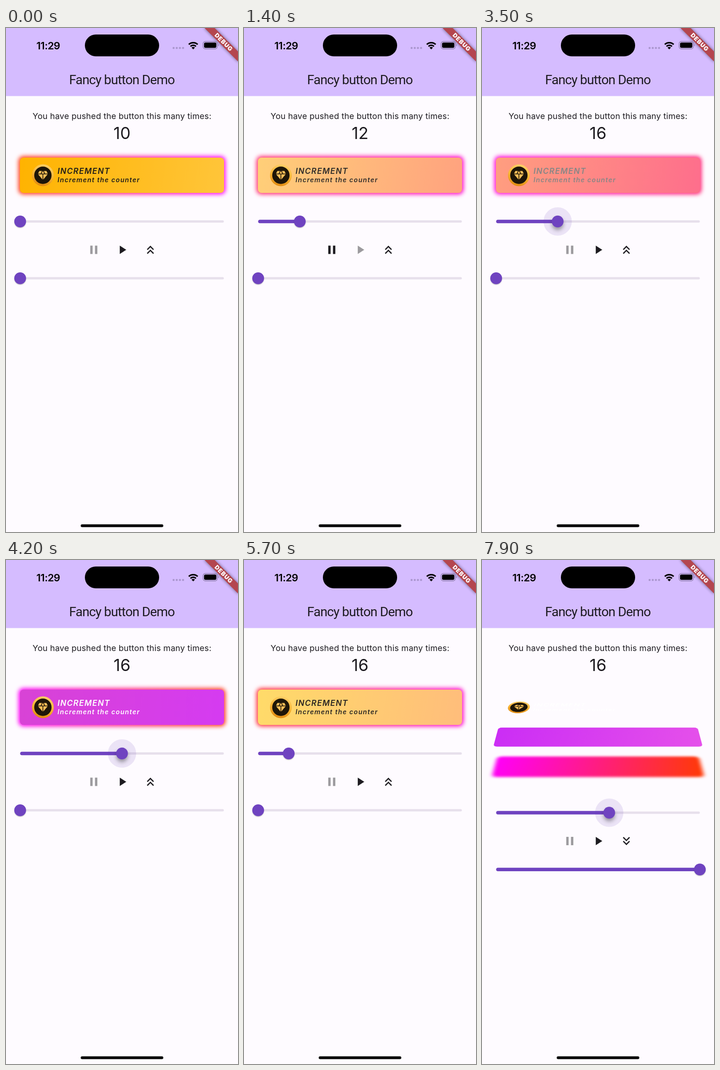
Write an HTML page that moves like this. It is 500 px wide and 1085 px high and loops after 8000 ms.

```html
<!DOCTYPE html>
<html lang="en">
<head>
<meta charset="utf-8">
<title>Fancy button Demo</title>
<style>
  html, body { margin: 0; width: 100%; height: 100%; overflow: hidden; background: #fefbff; }
  #stage { position: relative; width: 500px; height: 1085px; overflow: hidden; background: #fefbff; }
  svg { position: absolute; left: 0; top: 0; font-family: Inter, "Open Sans", sans-serif; }
  .layer { position: absolute; left: 30px; top: 279px; width: 440px; height: 76px; }
  #plate { border-radius: 8px; }
  #glow { margin: -3px; padding: 3px; border-radius: 10px; filter: blur(5px); }
  #label svg { overflow: visible; }
  #label text { font-weight: 600; font-style: italic; letter-spacing: 1.3px; }
</style>
</head>
<body>
<div id="stage">
  <svg width="500" height="1085" viewBox="0 0 500 1085">
    <defs>
      <filter id="soft" x="-50%" y="-200%" width="200%" height="500%"><feGaussianBlur stdDeviation="3.5"/></filter>
    </defs>
    <rect width="500" height="146.5" fill="#d5bcff"/>
    <text x="91" y="45.5" font-size="22" font-weight="600" letter-spacing="-.5" text-anchor="middle">11:29</text>
    <rect x="170" y="14" width="160" height="47" rx="23.5"/>
    <g fill="#ab97cf">
      <circle cx="361.2" cy="43" r="2.3"/><circle cx="368" cy="43" r="2.3"/>
      <circle cx="374.8" cy="43" r="2.3"/><circle cx="381.6" cy="43" r="2.3"/>
    </g>
    <g fill="none" stroke="#000" stroke-width="3.2">
      <path d="M393.9 35.4a13.9 13.9 0 0 1 19.2 0"/>
      <path d="M397.6 39.6a8.5 8.5 0 0 1 11.8 0"/>
    </g>
    <path d="M403.5 46l-3.6-3.7a5.2 5.2 0 0 1 7.2 0z"/>
    <rect x="424.6" y="29" width="31" height="16" rx="5" fill="none" stroke="#8f7eac" stroke-width="1.3"/>
    <rect x="426.8" y="31.2" width="26.6" height="11.6" rx="3.2"/>
    <path d="M457.2 34.5q2.4 2.5 0 5z" fill="#8f7eac"/>
    <g transform="translate(469.4 30.6) rotate(45)">
      <rect x="-51" y="-7.6" width="102" height="15.3" opacity=".5" filter="url(#soft)"/>
      <rect x="-51" y="-7.6" width="102" height="15.3" fill="#b4464f"/>
      <text y="4.6" font-size="12.8" font-weight="900" letter-spacing="1" fill="#fff" text-anchor="middle">DEBUG</text>
    </g>
    <g fill="#1d1b20" text-anchor="middle">
      <text x="249.6" y="121" font-size="28" letter-spacing="-.85" style="font-family:Roboto,sans-serif">Fancy button Demo</text>
      <text x="250" y="196" font-size="17.8" letter-spacing=".2">You have pushed the button this many times:</text>
      <text id="count" x="250" y="238.5" font-size="35.6">10</text>
    </g>
    <rect x="161" y="1068.5" width="178" height="6" rx="3"/>
  </svg>

  <div id="glow" class="layer"></div>
  <div id="plate" class="layer"></div>
  <div id="label" class="layer">
    <svg width="440" height="76" viewBox="30 279 440 76">
      <defs>
        <linearGradient id="gold" x1=".65" y1="0" x2=".4" y2="1">
          <stop offset="0" stop-color="#ffd06a"/><stop offset=".5" stop-color="#f9b535"/><stop offset="1" stop-color="#df890f"/>
        </linearGradient>
      </defs>
      <circle cx="79.5" cy="317" r="23.5" fill="url(#gold)"/>
      <circle cx="79.5" cy="317" r="18.7" fill="#1e1608"/>
      <path transform="translate(79.5 317) scale(1.09) translate(-12 -11.55)" fill="#f6bd58"
        d="M12.16 3h-.32L9.21 8.25h5.58zM16.46 8.25h5.16L19 3h-5.16zM21.38 9.75h-8.63V20.1zM11.25 20.1V9.75H2.62zM7.54 8.25L10.16 3H5L2.38 8.25z"/>
      <text x="111" y="314" font-size="17">INCREMENT</text>
      <text x="111" y="332.3" font-size="14.1">Increment the counter</text>
    </svg>
  </div>

  <svg id="controls" width="500" height="1085" viewBox="0 0 500 1085"></svg>
</div>

<script>
const LOOP = 8000, STEP = 100, LEFT = 30.5, WIDTH = 439, DROP = 127.5;
const INK = '#1d1b20', OFF = '#9c9a9e';
const $ = id => document.getElementById(id);

// Both sliders over time: [ms, value]
const progress = [[0, 0], [378, 0], [2600, .4444], [3300, .4444], [3500, .302], [3800, .1],
  [4550, .85], [4900, .696], [5450, .15], [7440, .15], [7900, .555]];
const spread = [[0, 0], [6383, 0], [6883, 1]];
const halo = [[0, 0], [3250, 0], [3400, 1], [5450, 1], [5600, 0], [7400, 0], [7550, 1]];
const clicks = [1000, 1300, 1500, 1700, 1900, 2100];

// Colours over slider value
const plateColor = [[0, '#ffb300'], [.09, '#ffc53a'], [.15, '#ffdb69'], [.204, '#ffcf78'],
  [.28, '#ffa97e'], [.364, '#ff7e82'], [.39, '#ff6f8b'], [.46, '#e253bd'], [.555, '#cb2df5'],
  [.645, '#e550ea'], [.696, '#f764e2'], [.786, '#fc8fbd'], [1, '#ffb300']];
const glowLeft = [[0, '#ff3d10'], [.15, '#ff2d30'], [.204, '#ff2a6a'], [.302, '#ff00d8'],
  [.364, '#ff00ff'], [.555, '#ff00fa'], [.696, '#ff2a50'], [1, '#ff3d10']];
const glowRight = [[0, '#ff00ff'], [.15, '#ff00cc'], [.204, '#ff00cc'], [.302, '#ff1f70'],
  [.364, '#ff4030'], [.555, '#ff3a05'], [.696, '#ff3040'], [1, '#ff00ff']];
const textColor = [[0, '#231f1a'], [.2, '#2c2926'], [.302, '#888686'], [.364, '#d2cacc'],
  [.45, '#ffffff'], [.6, '#ffffff'], [.696, '#c6bec2'], [.9, '#231f1a']];

function sample(table, x, mix) {
  const i = table.findIndex(p => p[0] > x);
  if (i < 0) return table[table.length - 1][1];
  if (!i) return table[0][1];
  const [x0, a] = table[i - 1], [x1, b] = table[i];
  return mix(a, b, (x - x0) / (x1 - x0));
}
const lerp = (a, b, k) => a + (b - a) * k;
const channels = hex => [1, 3, 5].map(i => parseInt(hex.slice(i, i + 2), 16));
function blend(a, b, k) {
  const end = channels(b);
  return `rgb(${channels(a).map((v, i) => Math.round(lerp(v, end[i], k)))})`;
}
const number = (table, x) => sample(table, x, lerp);
const color = (table, x) => sample(table, x, blend);

function set(node, attrs) {
  for (const key in attrs) node.setAttribute(key, attrs[key]);
}
function add(parent, tag, attrs) {
  const node = document.createElementNS('http://www.w3.org/2000/svg', tag);
  set(node, attrs);
  return parent.appendChild(node);
}

const panel = add($('controls'), 'g', {});

function makeSlider(y) {
  add(panel, 'rect', { x: LEFT, y: y - 2.5, width: WIDTH, height: 5, rx: 2.5, fill: '#e7e0ec' });
  const bar = add(panel, 'rect', { x: LEFT, y: y - 3.8, height: 7.6, rx: 3.8, fill: '#6f43c0' });
  const thumb = add(panel, 'g', {});
  const ring = add(thumb, 'circle', { fill: '#673ab7', opacity: .12 });
  const shade = add(thumb, 'circle', { r: 12.2, fill: '#000' });
  add(thumb, 'circle', { r: 12.7, fill: '#6f43c0' });
  return (value, held) => {
    const x = WIDTH * value;
    set(bar, { width: x });
    set(thumb, { transform: `translate(${LEFT + x} ${y})` });
    set(ring, { r: 30.5 * held });
    set(shade, { cy: lerp(1.6, 6, held), opacity: lerp(.3, .36, held) });
    shade.style.filter = `blur(${lerp(1.2, 4, held)}px)`;
  };
}

function makeIcon(x, d) {
  const group = add(panel, 'g', { transform: `translate(${x} 477.5)` });
  const ripple = add(group, 'circle', { r: 25, fill: INK });
  const path = add(group, 'path', { d });
  return (t, tap, fill, turn = 1) => {
    const age = (t - tap) / 600;
    const on = age >= 0 && age < 1;
    set(ripple, { opacity: on ? .1 * (1 - age) : 0 });
    set(path, { fill, transform: `scale(1.272 ${1.272 * turn}) translate(-12 -12)` });
  };
}

const sliderA = makeSlider(416.5), sliderB = makeSlider(538.7);
const pause = makeIcon(189.2, 'M6 19h4V5H6zM14 5v14h4V5z');
const play = makeIcon(250.3, 'M8 5v14l11-7z');
const arrows = makeIcon(311.2, 'M6 17.59L7.41 19 12 14.42 16.59 19 18 17.59l-6-6zM6 11l1.41 1.41L12 7.83l4.59 4.58L18 11l-6-6z');

const gradient = (a, b) => `linear-gradient(99deg, ${a}, ${b})`;

function draw(t) {
  const s = number(progress, t), e = number(spread, t);
  const playing = t >= 400 && t < 2600;

  $('count').textContent = 10 + clicks.filter(c => c <= t).length;
  $('plate').style.background = gradient(color(plateColor, s), color(plateColor, s + .09));
  $('glow').style.background = gradient(color(glowLeft, s), color(glowRight, s));
  $('label').style.fill = color(textColor, s);
  ['label', 'plate', 'glow'].forEach((id, depth) => {
    $(id).style.transform = `translateY(${depth * e * DROP / 2}px) perspective(1272px) rotateX(${e}rad)`;
  });

  set(panel, { transform: `translate(0 ${e * DROP})` });
  sliderA(s, number(halo, t));
  sliderB(e, 0);
  pause(t, 2500, playing ? INK : OFF);
  play(t, 400, playing ? OFF : INK);
  arrows(t, 6400, INK, t >= 6400 ? -1 : 1);
}

const start = performance.now();
function tick() {
  const t = (performance.now() - start) % LOOP;
  draw(Math.floor(t / STEP) * STEP);
  requestAnimationFrame(tick);
}
draw(0);
requestAnimationFrame(tick);
</script>
</body>
</html>
```
